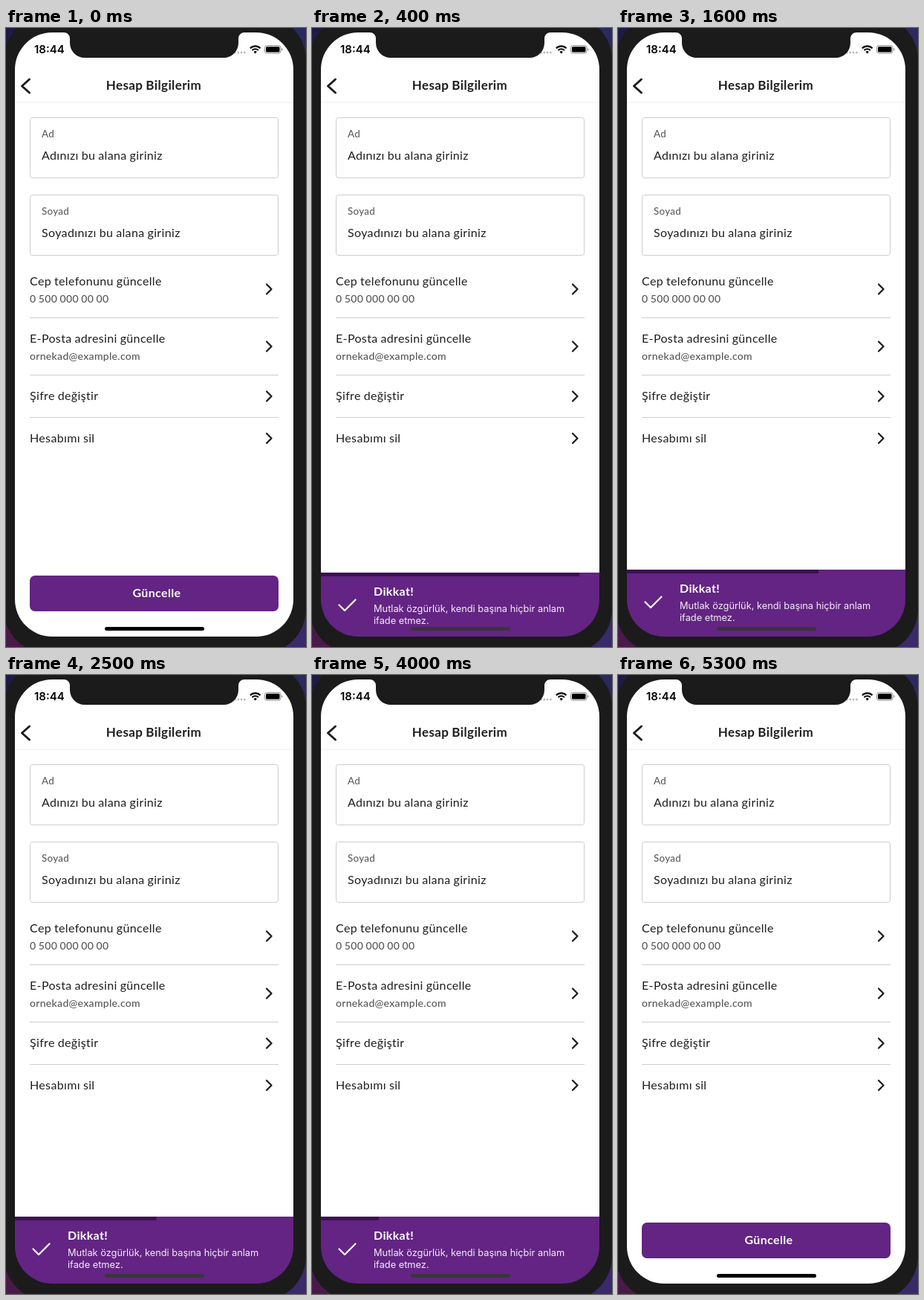
An HTML page for the animation above (5.7 s loop, 404 by 832 pixels).

```html
<!DOCTYPE html>
<html lang="tr">
<head>
<meta charset="utf-8">
<title>Hesap Bilgilerim</title>
<style>
  html, body { margin: 0; width: 100%; height: 100%; overflow: hidden; background: #1b1b1b; }
  svg { display: block; width: 404px; height: 832px; }
  text { font-family: Lato, "Open Sans", sans-serif; font-size: 16px; fill: #1e1e20; letter-spacing: .022em; word-spacing: -.03em; }
  .title { font-size: 17px; font-weight: 700; text-anchor: middle; }
  .small { font-size: 14px; font-weight: 500; fill: #555; }
  .label { font-size: 13.4px; font-weight: 500; fill: #5c5c5c; }
  .strong { font-weight: 700; fill: #fff; }
  .mid { text-anchor: middle; }
  .clock, .note { font-family: Inter, sans-serif; letter-spacing: 0; word-spacing: 0; }
  .clock { font-size: 15px; font-weight: 600; fill: #000; }
  .note { font-size: 12.8px; fill: #f4eef7; }
  .line { fill: none; stroke: #cdcdcd; }
  .icon { fill: none; stroke: #1e1e20; stroke-width: 2.3; stroke-linecap: round; stroke-linejoin: round; }
  .back { stroke-width: 3; }
  .check { stroke: #fff; }
</style>
</head>
<body>
<svg viewBox="0 0 404 832">
  <defs>
    <linearGradient id="left" x2="0" y2="1">
      <stop offset="0" stop-color="#1d1b45"/><stop offset="1" stop-color="#4a1a48"/>
    </linearGradient>
    <linearGradient id="right" x2="0" y2="1">
      <stop offset="0" stop-color="#2a2960"/><stop offset="1" stop-color="#3a2a6c"/>
    </linearGradient>
    <mask id="bezel">
      <rect x="-3" y="-17" width="407" height="858" rx="60" fill="#fff"/>
      <rect x="12" y="6" width="375" height="812" rx="50"/>
    </mask>
  </defs>

  <rect width="202" height="832" fill="url(#left)"/>
  <rect x="202" width="202" height="832" fill="url(#right)"/>
  <rect x="12" y="6" width="375" height="812" rx="40" fill="#fff"/>

  <text class="clock" x="38" y="34">18:44</text>
  <g fill="#b9b9bb">
    <circle cx="308.5" cy="33" r="1.4"/><circle cx="312.8" cy="33" r="1.4"/>
    <circle cx="317.1" cy="33" r="1.4"/><circle cx="321.4" cy="33" r="1.4"/>
  </g>
  <g fill="none" stroke="#000" stroke-width="2.1">
    <path d="M328.9 27.2a9.6 9.6 0 0 1 13.6 0"/>
    <path d="M331.5 29.9a6 6 0 0 1 8.4 0"/>
  </g>
  <path d="M333.5 32.1a3.2 3.2 0 0 1 4.4 0l-2.2 2.3z"/>
  <rect x="348.5" y="23.5" width="21.5" height="10.5" rx="3" fill="none" stroke="#8c8c8c"/>
  <rect x="350" y="25" width="18.5" height="7.5" rx="1.6"/>
  <path d="M371.3 27v3.6q1.4-.5 1.4-1.8t-1.4-1.8z" fill="#8c8c8c"/>

  <path class="icon back" d="M31.5 69L21.5 78l10 9"/>
  <text class="title" x="199" y="82.5">Hesap Bilgilerim</text>
  <path d="M12 100h375" stroke="#eee"/>

  <rect class="line" x="32.5" y="120.5" width="334" height="81" rx="3"/>
  <text class="label" x="48" y="146.5">Ad</text>
  <text x="48" y="177">Adınızı bu alana giriniz</text>
  <rect class="line" x="32.5" y="224.5" width="334" height="81" rx="3"/>
  <text class="label" x="48" y="250.5">Soyad</text>
  <text x="48" y="281">Soyadınızı bu alana giriniz</text>

  <text x="32" y="345.5">Cep telefonunu güncelle</text>
  <text class="small" x="32" y="368.5">0 500 000 00 00</text>
  <text x="32" y="422.5">E-Posta adresini güncelle</text>
  <text class="small" x="32" y="445.5">ornekad@example.com</text>
  <text x="32" y="500">Şifre değiştir</text>
  <text x="32" y="556.5">Hesabımı sil</text>
  <path class="line" d="M32 389.5h335M32 466.5h335M32 523.5h335"/>
  <g id="arrows"></g>

  <rect x="32" y="736" width="335" height="48" rx="7" fill="#632483"/>
  <text class="strong mid" x="203" y="765">Güncelle</text>

  <g id="toast" visibility="hidden">
    <rect x="12" y="728" width="375" height="90" fill="#632483"/>
    <rect id="bar" x="12" y="728" width="375" height="5" fill="#3c1152"/>
    <path class="icon check" d="M36.5 771.5l7.5 7.5 14.5-14.5"/>
    <text class="strong" x="83" y="759">Dikkat!</text>
    <text class="note" x="83" y="781">Mutlak özgürlük, kendi başına hiçbir anlam</text>
    <text class="note" x="83" y="796.5">ifade etmez.</text>
  </g>
  <rect id="home" x="133" y="805" width="134" height="5" rx="2.5"/>

  <rect width="404" height="832" fill="#1b1b1b" mask="url(#bezel)"/>
  <path d="M78 0V6a8 8 0 0 1 8 8v6a20 20 0 0 0 20 20h187a20 20 0 0 0 20-20v-6a8 8 0 0 1 8-8V0z" fill="#1b1b1b"/>
</svg>
<script>
  const LOOP = 5700, STEP = 100;
  const ENTER = 70, BAR_START = 40, BAR_TIME = 5000, EXIT = 5040, EXIT_TIME = 250;
  const RISE = 77, HEIGHT = 90, WIDTH = 375;
  const $ = id => document.getElementById(id);
  const toast = $('toast'), bar = $('bar'), home = $('home');

  $('arrows').innerHTML = [351, 428, 495, 551.5]
    .map(y => `<path class="icon" d="M351 ${y - 6.5}l6.5 6.5-6.5 6.5"/>`).join('');

  const elasticOut = p => p >= 1 ? 1
    : 1 + 2 ** (-10 * p) * Math.sin((p - 0.1) * Math.PI * 5);

  function offset(t) {
    if (t < EXIT) return RISE * (1 - elasticOut((t - ENTER) / 1000));
    return HEIGHT * ((t - EXIT) / EXIT_TIME) ** 1.5;
  }

  function draw(t) {
    const shown = t >= ENTER && t < EXIT + EXIT_TIME;
    toast.setAttribute('visibility', shown ? 'visible' : 'hidden');
    home.setAttribute('fill', shown ? '#38353b' : '#000');
    if (!shown) return;
    const left = Math.min(1, Math.max(0, 1 - (t - BAR_START) / BAR_TIME));
    toast.setAttribute('transform', `translate(0 ${Math.round(offset(t))})`);
    bar.setAttribute('width', (WIDTH * left).toFixed(2));
  }

  const start = performance.now();
  function tick() {
    const t = (performance.now() - start) % LOOP;
    draw(Math.floor(t / STEP) * STEP);
    requestAnimationFrame(tick);
  }
  tick();
</script>
</body>
</html>
```
